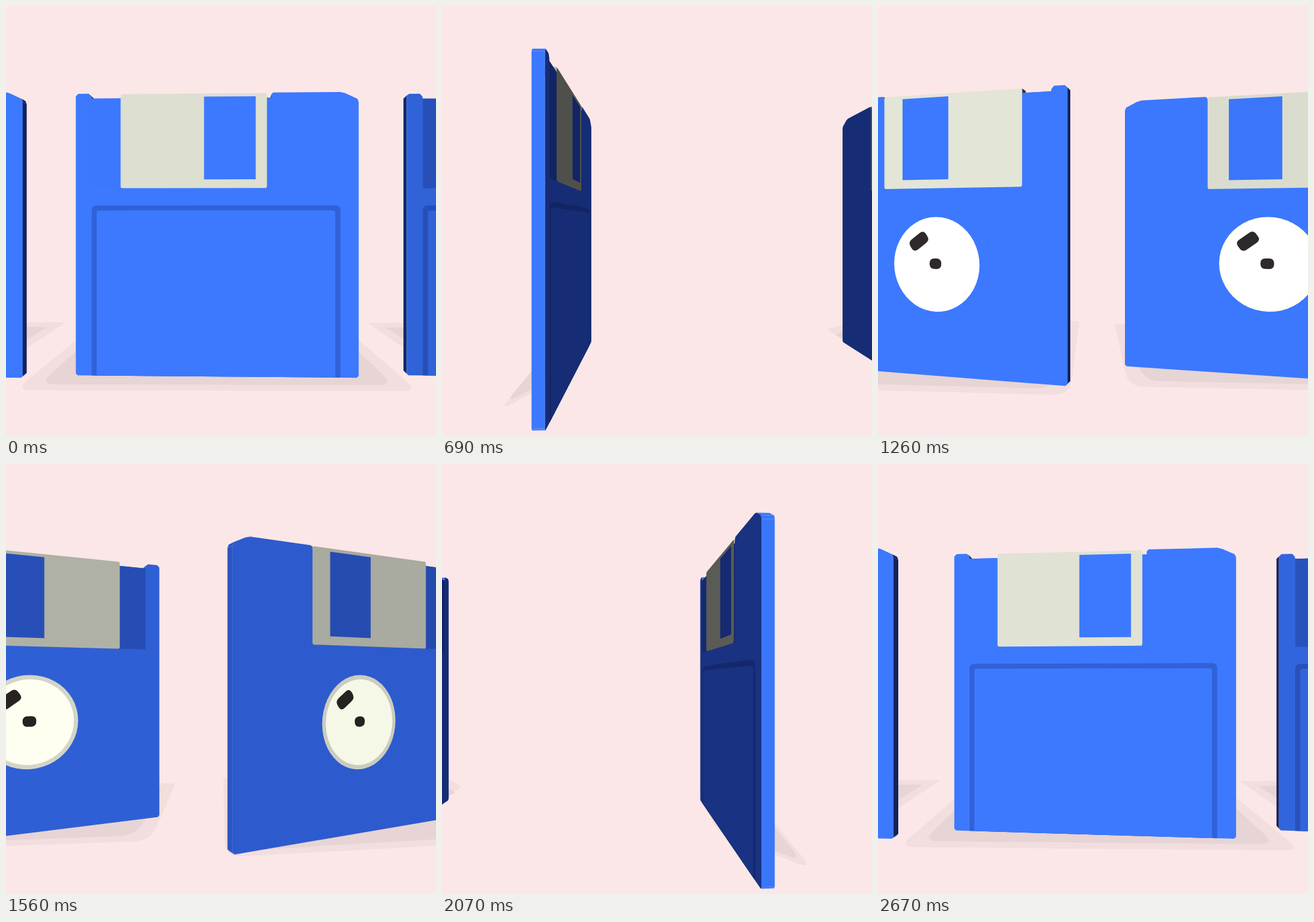
Recreate the animation shown at these times as an HTML page. Size 700x700 px, loop 2700 ms.

```html
<!DOCTYPE html>
<html lang="en">
<head>
<meta charset="utf-8">
<title>Floppy disks</title>
<style>
html, body { margin: 0; width: 100%; height: 100%; overflow: hidden; background: #fbe7e7; }
svg { display: block; width: 100%; height: 100%; }
</style>
</head>
<body>
<svg id="stage" viewBox="0 0 700 700"></svg>
<script>
const LOOP = 2700, STEP = 30, GAP = 536, DEPTH = 840, FLOOR = 250;
const FRONT = 10.5, BACK = -5.5;
const stage = document.getElementById('stage');

// Body outline, clockwise from the lower left, as [u, v]
const OUTLINE = [
  [-224, 250], [-227, 247], [-227, -202], [-223, -206], [-206, -206], [-202, -202],
  [-201, -198], [89, -198], [89, -203], [92, -206], [199, -206], [207, -204],
  [226, -195], [228, -190], [228, 247], [225, 250]
];

const clamp = (x, lo, hi) => Math.max(lo, Math.min(hi, x));

const box = (l, t, r, b, round = 0, low = round) =>
  [[l, b, low], [l, t, round], [r, t, round], [r, b, low]];

function pill(cu, cv, w, h, r, turn) {
  const c = Math.cos(turn), s = Math.sin(turn);
  return box(-w / 2, -h / 2, w / 2, h / 2, r)
    .map(([x, y]) => [cu + x * c - y * s, cv + x * s + y * c, r]);
}

function disc(cu, cv, r) {
  return Array.from({ length: 48 }, (_, i) => {
    const a = i * Math.PI / 24;
    return [cu + r * Math.cos(a), cv + r * Math.sin(a)];
  });
}

function toScreen(x, v, z) {
  const s = DEPTH / (DEPTH - z);
  return [350 + x * s, 350 + v * s, s];
}

// Path through points [x, y, radius], corners rounded
function pathOf(pts) {
  const n = pts.length;
  const toward = (p, q, r) => {
    const d = Math.hypot(q[0] - p[0], q[1] - p[1]) || 1;
    const k = Math.min(r / d, 0.5);
    return (p[0] + (q[0] - p[0]) * k).toFixed(2) + ' ' + (p[1] + (q[1] - p[1]) * k).toFixed(2);
  };
  let d = '';
  pts.forEach((p, i) => {
    const r = p[2] || 0;
    d += (i ? 'L' : 'M') + toward(p, pts[(i + n - 1) % n], r);
    if (r) d += `Q${p[0].toFixed(2)} ${p[1].toFixed(2)} ` + toward(p, pts[(i + 1) % n], r);
  });
  return d + 'Z';
}

const fill = (pts, color) => `<path d="${pathOf(pts)}" fill="${color}"/>`;
const rgb = (...c) => `rgb(${c.map(x => Math.round(clamp(x, 0, 255)))})`;

function blue(b) {
  b = clamp(b, 0, 1);
  const k = Math.pow(b, 1.28);
  return rgb(60 * k, 121 * k, 255 * b);
}
const metal = f => rgb(255 * f, 257 * f, 241 * f);
const light = (nx, nz) => 0.09 + 0.8 * Math.max(0, nz * 0.966 - nx * 0.259);
const tone = f => 0.16 + 0.97 * f;

function shadow(X, turn, inner) {
  const c = Math.cos(turn), s = Math.sin(turn);
  const end = u => {
    const x = X + u * c, z = -u * s;
    const dir = clamp(3 * c * Math.sign(u), -1, 1);
    const outward = dir * Math.sign(x);
    const lift = z > 0 ? z * (1 + outward) / 2 : z;
    const grow = Math.max(1.25 + 0.0018 * lift, 1.01 + 0.07 * outward);
    const sx = x * grow + dir * (12 - (inner ? 26 : 0));
    return {
      front: toScreen(sx, FLOOR, 80 + 0.36 * z - (inner ? 28 : 0)),
      back: toScreen(sx, FLOOR, -430 - 0.34 * z + (inner ? 55 : 0))
    };
  };
  const a = end(-228), b = end(228);
  const pts = [a.back, b.back, b.front, a.front]
    .map((p, i) => [p[0], p[1], i < 2 ? 3 : 26]);
  return fill(pts, inner ? '#e7d4d4' : '#f2dede');
}

function disk(X, turn) {
  const c = Math.cos(turn), s = Math.sin(turn);
  const at = (u, v, w) => toScreen(X + u * c + w * s, v, -u * s + w * c);
  const facing = DEPTH * c - X * s;
  const front = facing > 0;
  const shutterEnd = front ? 82 : 89;
  let out = '';

  const wall = (a, b, color) => {
    const quad = [at(...a, FRONT), at(...b, FRONT), at(...b, BACK), at(...a, BACK)];
    out += fill(quad.map(p => [p[0], p[1]]), color);
  };
  const sees = (nu, nv, u, v) =>
    -nu * c * (X + u * c) - nv * v - nu * s * (DEPTH + u * s) > 0;

  // Shutter ends that rise above the recess
  for (const u of [-154, shutterEnd]) {
    const dir = Math.sign(u);
    if (sees(dir, 0, u, 0))
      wall([u, -192], [u, -205], metal(Math.max(0.25, light(dir * c, -dir * s)) * 0.8));
  }

  OUTLINE.forEach((a, i) => {
    const b = OUTLINE[(i + 1) % OUTLINE.length];
    const len = Math.hypot(b[0] - a[0], b[1] - a[1]);
    const nu = (b[1] - a[1]) / len, nv = (a[0] - b[0]) / len;
    if (!sees(nu, nv, a[0], a[1])) return;
    const dir = nu < 0 ? -1 : 1;
    wall(a, b, blue(Math.max(0.37, tone(light(dir * c, -dir * s)))));
  });

  if (facing <= FRONT && facing >= BACK) return out;
  const side = front ? 1 : -1;
  const face = (shape, color) => {
    out += fill(shape.map(([u, v, r = 0]) => {
      const p = at(u, v, front ? FRONT : BACK);
      return [p[0], p[1], r * p[2]];
    }), color);
  };

  const nx = s * side, nz = c * side;
  const fade = X > 0 ? 6e-7 * X * X * clamp(1 + Math.atan2(nx, nz) / 0.87, 0, 1) : 0;
  const f = Math.max(0.31, light(nx, nz) - fade);
  const b = Math.min(1, tone(f));
  const sunk = b * (0.85 + 0.15 * clamp((f - 0.8) / 0.07, 0, 1));

  face(OUTLINE, blue(b));
  face(box(-201, -198, 89, -53), blue(sunk));
  if (front) {
    face(box(-201, -25, 199, 250, 8, 0), blue(b * 0.84));
    face(box(-193, -17, 191, 250, 4, 0), blue(b));
  } else {
    const dark = rgb(47 * b, 42 * b, 42 * b);
    face(disc(-6, 70, 76.5), metal(f * 1.2));
    face(disc(-6, 70, 69.5), metal(f * 1.45));
    face(pill(-5, 69, 21, 17, 8, 0), dark);
    face(pill(25, 33, 35, 20, 8, 0.63), dark);
  }
  face(box(-154, -205, shutterEnd, -53, 3), metal(f));
  face(front ? box(-19, -200, 64, -67) : box(-28, -200, 55, -67), blue(sunk * 1.02));
  return out;
}

function draw(t) {
  const p = t / LOOP;
  const turn = p * 2 * Math.PI - 0.0286;
  const row = [-1, 0, 1, 2].map(i => -8 + GAP * (i - p));
  stage.innerHTML = '<rect width="700" height="700" fill="#fbe7e7"/>' +
    row.map(X => shadow(X, turn, false)).join('') +
    row.map(X => shadow(X, turn, true)).join('') +
    row.sort((a, b) => Math.abs(b) - Math.abs(a)).map(X => disk(X, turn)).join('');
}

const start = performance.now();
function tick() {
  const t = (performance.now() - start) % LOOP;
  draw(Math.floor(t / STEP) * STEP);
  requestAnimationFrame(tick);
}
tick();
</script>
</body>
</html>
```
